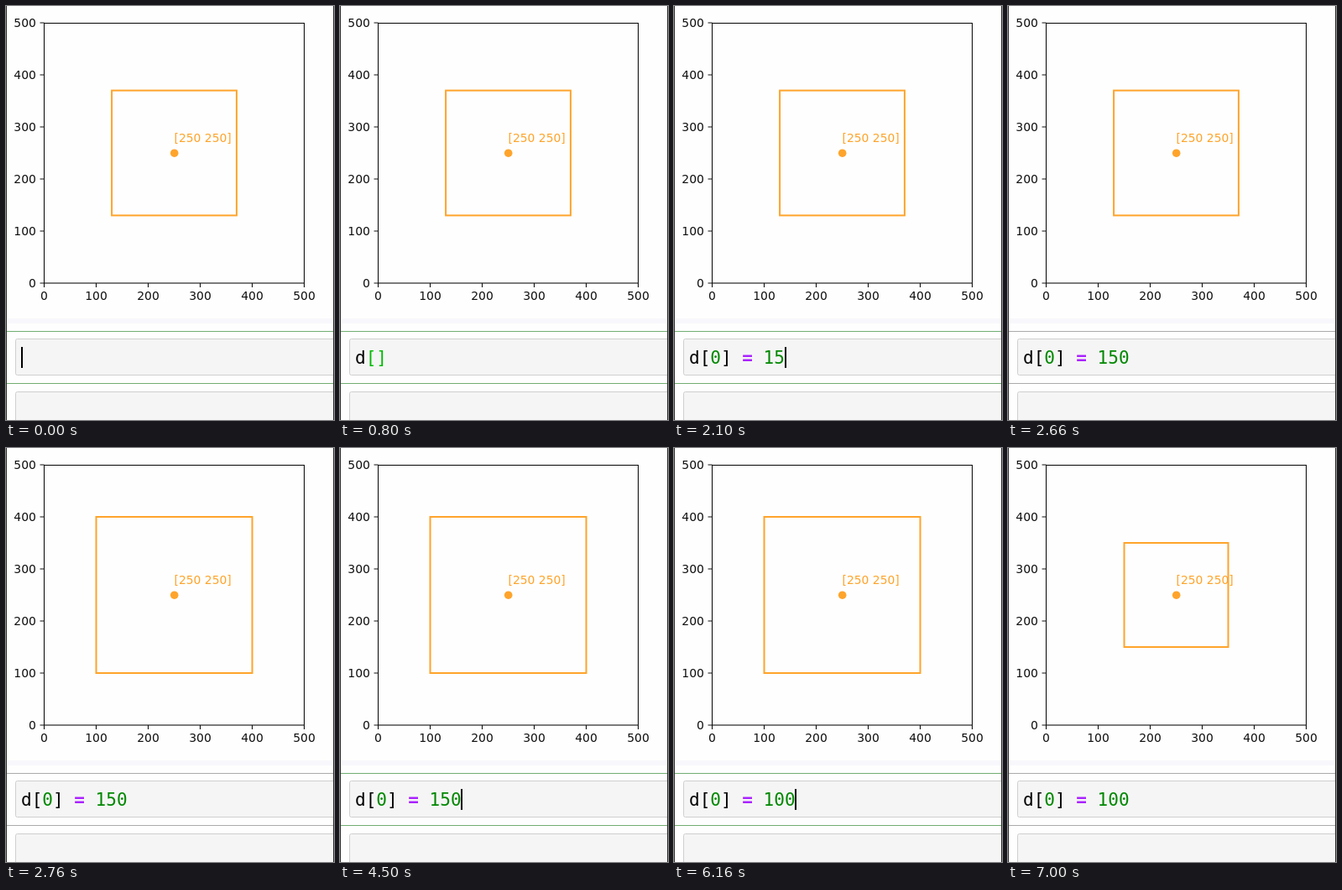
Recreate the animation shown at these times as an HTML page. Size 391 by 493 pixels, loop 8000 ms.

```html
<!DOCTYPE html>
<html lang="en">
<head>
<meta charset="utf-8">
<title>Square and centre</title>
<style>
  html, body { margin: 0; width: 100%; height: 100%; overflow: hidden; background: #fefefe; }
  svg { display: block; width: 391px; height: 493px; }
  .plot { font: 13.89px "DejaVu Sans", sans-serif; fill: #111; }
  .code { font: 21px "DejaVu Sans Mono", monospace; white-space: pre; fill: #000; }
  .num { fill: #080; }
  .op { fill: #a2f; font-weight: bold; }
  .match { fill: #0b0; }
  .axis { stroke: #111; stroke-width: 1.1; fill: none; }
  .input { fill: #f5f5f5; stroke: #cfcfcf; }
</style>
</head>
<body>
<svg viewBox="0 0 391 493">
  <rect width="391" height="493" fill="#fefefe"/>
  <rect y="372" width="391" height="6" fill="#f8f8fc"/>
  <g id="plot" class="plot">
    <rect class="axis" x="45.5" y="20.5" width="310" height="309.5"/>
  </g>
  <g fill="#ffa42b">
    <rect id="square" fill="none" stroke="#ffa42b" stroke-width="2"/>
    <circle cx="200.7" cy="175.2" r="4.8"/>
    <text class="plot" x="200.5" y="162" style="fill:#ffa42b">[250 250]</text>
  </g>
  <path id="cell" d="M1 387.5H390M1 449.5H390"/>
  <rect class="input" x="11.5" y="396.5" width="400" height="43" rx="2"/>
  <rect class="input" x="11.5" y="459.5" width="400" height="43" rx="2"/>
  <text id="code" class="code" x="18" y="425.5"></text>
  <rect id="caret" y="406" width="2" height="25"/>
  <path d="M.5 0V493M390.5 0V493" stroke="#333"/>
</svg>
<script>
const SVG = "http://www.w3.org/2000/svg";
const LOOP = 8000, CHAR = 12.64, SCALE = 0.62;
const $ = id => document.getElementById(id);

function add(parent, tag, attrs, text = "") {
  const el = document.createElementNS(SVG, tag);
  for (const key in attrs) el.setAttribute(key, attrs[key]);
  el.textContent = text;
  parent.append(el);
}

for (let v = 0; v <= 500; v += 100) {
  const x = 45.5 + v * SCALE, y = 330 - v * SCALE;
  add($("plot"), "path", { class: "axis", d: `M${x} 330v5M45.5 ${y}h-5` });
  add($("plot"), "text", { x, y: 350, "text-anchor": "middle" }, v);
  add($("plot"), "text", { x: 35.8, y: y + 5, "text-anchor": "end" }, v);
}

// time, code, caret column (-1 hidden), brackets matched
const typing = [
  [0, "", 0],
  [60, "", -1],
  [330, "d", 1],
  [430, "d[]", 2],
  [530, "d[]", 2, true],
  [800, "d[]", -1, true],
  [1000, "d[0]", 3, true],
  [1260, "d[0]", -1, true],
  [1300, "d[0]", 4, true],
  [1530, "d[0] ", 5],
  [1660, "d[0] =", 6],
  [1730, "d[0] = ", 7],
  [1960, "d[0] = 1", 8],
  [2100, "d[0] = 15", 9],
  [2160, "d[0] = 150", 10],
  [2660, "d[0] = 150", -1],
  [4500, "d[0] = 150", 10],
  [5060, "d[0] = 150", -1],
  [5230, "d[0] = 15", 9],
  [5360, "d[0] = 1", 8],
  [5900, "d[0] = 1", -1],
  [6030, "d[0] = 10", 9],
  [6160, "d[0] = 100", 10],
  [6730, "d[0] = 100", -1]
];
const sizes = [[0, 120], [2760, 150], [7000, 100]];
const editing = [[0, true], [2660, false], [4500, true], [6930, false]];

const at = (steps, t) => steps.findLast(s => s[0] <= t);

function drawCode([, text, col, matched]) {
  $("code").replaceChildren();
  for (const part of text.match(/\d+|=|[\[\]]|[^\d=\[\]]+/g) || []) {
    const kind = /\d/.test(part) ? "num" : part === "=" ? "op"
      : matched && /[\[\]]/.test(part) ? "match" : "plain";
    add($("code"), "tspan", { class: kind }, part);
  }
  $("caret").setAttribute("x", Math.round(18 + col * CHAR));
  $("caret").setAttribute("visibility", col < 0 ? "hidden" : "visible");
}

function drawSquare(half) {
  const side = 2 * half * SCALE;
  const box = { x: 200.5 - side / 2, y: 175 - side / 2, width: side, height: side };
  for (const key in box) $("square").setAttribute(key, box[key]);
}

let shown;
function frame(now) {
  const t = now % LOOP;
  const step = at(typing, t);
  if (step !== shown) drawCode(shown = step);
  drawSquare(at(sizes, t)[1]);
  $("cell").setAttribute("stroke", at(editing, t)[1] ? "#72ad72" : "#ababab");
}

const start = performance.now();
function tick() {
  frame(performance.now() - start);
  requestAnimationFrame(tick);
}
tick();
</script>
</body>
</html>
```
